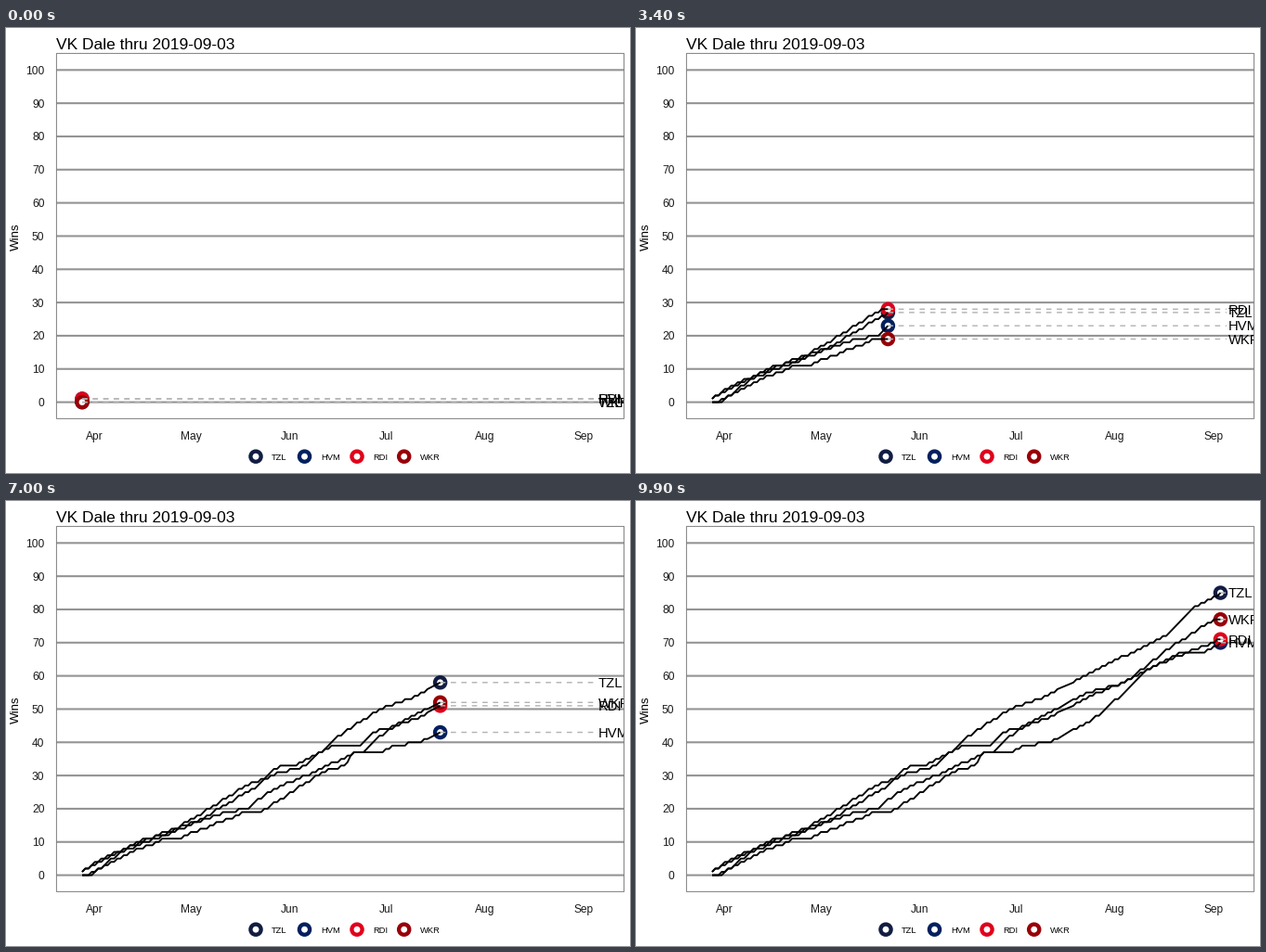
Animation of 672x480 px, one loop 10 s. Source, as a matplotlib script:

```python
import numpy as np
import matplotlib.pyplot as plt
from matplotlib.animation import FuncAnimation
from matplotlib.patches import Circle, Rectangle

W, H, DPI = 672, 480, 96
PT = 72 / DPI
FRAMES, LAST_DAY = 100, 159
BREAK = range(109, 113)           # mid-season days without a row
LABEL_X, DASH_END = 638, 636
INK, GREY = "#1a1a1a", "#949494"

plt.rcParams["font.family"] = "Liberation Sans"


def px(day):
    return 82 + 3.443 * np.asarray(day)


def py(wins):
    return 403.6 - 3.583 * np.asarray(wins)


def season(*turns):
    """A staircase of whole wins that follows the pace between turns."""
    days = np.setdiff1d(np.arange(LAST_DAY + 1), BREAK)
    return days, np.floor(np.interp(days, *zip(*turns)) + 0.5)


TEAMS = [  # name, colour, legend x, season
    ("TZL", "#111d42", 269, season(
        (0, 0), (3, 0), (12, 7), (34, 15), (55, 27), (59, 30), (70, 33),
        (79, 41), (93, 50), (105, 54), (129, 66), (142, 72), (150, 80),
        (159, 85))),
    ("HVM", "#00205e", 321.5, season(
        (0, 1), (6, 5), (26, 13), (45, 19), (52, 20), (58, 25), (70, 30),
        (86, 37), (93, 37), (98, 39), (106, 40), (118, 46), (129, 55),
        (135, 61), (147, 67), (154, 67), (159, 70))),
    ("RDI", "#e0001b", 378, season(
        (0, 1), (20, 11), (26, 12), (38, 19), (53, 28), (55, 28), (62, 33),
        (67, 33), (78, 39), (87, 39), (91, 43), (98, 45), (107, 48),
        (118, 54), (129, 58), (141, 64), (159, 71))),
    ("WKR", "#980008", 428.7, season(
        (0, 0), (2, 0), (13, 6), (26, 11), (30, 11), (51, 19), (56, 19),
        (75, 31), (82, 33), (85, 37), (88, 37), (92, 41), (98, 45),
        (118, 55), (129, 58), (144, 69), (157, 77), (159, 77))),
]

fig = plt.figure(figsize=(W / DPI, H / DPI), dpi=DPI, facecolor="white")
ax = fig.add_axes([0, 0, 1, 1])
ax.set_xlim(0, W)
ax.set_ylim(H, 0)
ax.axis("off")
panel = Rectangle((54.4, 27.4), 611.2, 394, fill=False, ec="#7f7f7f",
                  lw=1 * PT, zorder=9, snap=False)
ax.add_patch(panel)


def text(x, y, s, size, **kw):
    return ax.text(x, y, s, fontsize=size * PT, **kw)


def stroke(x, y, color, width, **kw):
    return ax.plot(x, y, color=color, lw=width * PT, snap=False,
                   solid_capstyle="butt", **kw)[0]


def ring(x, y, color, z=3):
    return ax.add_patch(Circle((x, y), 5.6, fc="white", ec=color,
                               lw=4.3 * PT, zorder=z, snap=False))


text(54, 23, "VK Dale thru 2019-09-03", 17.33)
text(11, 225, "Wins", 13.33, rotation=90, ha="center", va="center")

for n in range(0, 101, 10):
    stroke([54, 666], [py(n)] * 2, GREY, 2.1, zorder=1)
    text(41.5, py(n) + 4.4, str(n), 12, ha="right", color=INK)

for month, day in zip(("Apr", "May", "Jun", "Jul", "Aug", "Sep"),
                      (4, 34, 65, 95, 126, 157)):
    text(px(day), 444, month, 12, ha="center", color=INK)

parts = []
for k, (name, color, key_x, data) in enumerate(TEAMS):
    ring(key_x, 462.2, color)
    text(key_x + 17.3, 466, name, 9.33)
    dot = ring(0, 0, color, 3 + k / 10)
    dash = stroke([], [], "#b3b3b3", 1.42, dashes=(4, 4),
                  dash_capstyle="butt", zorder=4)
    line = stroke([], [], "black", 1.9, solid_joinstyle="round", zorder=5)
    label = text(LABEL_X, 0, name, 14.7, zorder=6, clip_on=True)
    for art in (dot, dash, line, label):
        art.set_clip_path(panel)
    parts.append((data, dot, dash, line, label))


def update(i):
    now = int(LAST_DAY * i / (FRAMES - 1) + 0.5)
    for (days, wins), dot, dash, line, label in parts:
        score = np.floor(np.interp(now, days, wins) + 0.5)
        x, y = px(now), py(score)
        past = days < now
        line.set_data(np.append(px(days[past]), x),
                      np.append(py(wins[past]), y))
        dot.center = x, y
        dash.set_data([x, DASH_END], [y, y])
        label.set_y(y + 5.3)
    return [art for part in parts for art in part[1:]]


anim = FuncAnimation(fig, update, frames=FRAMES, interval=100, repeat=True,
                     init_func=lambda: update(0))
plt.show()
```
